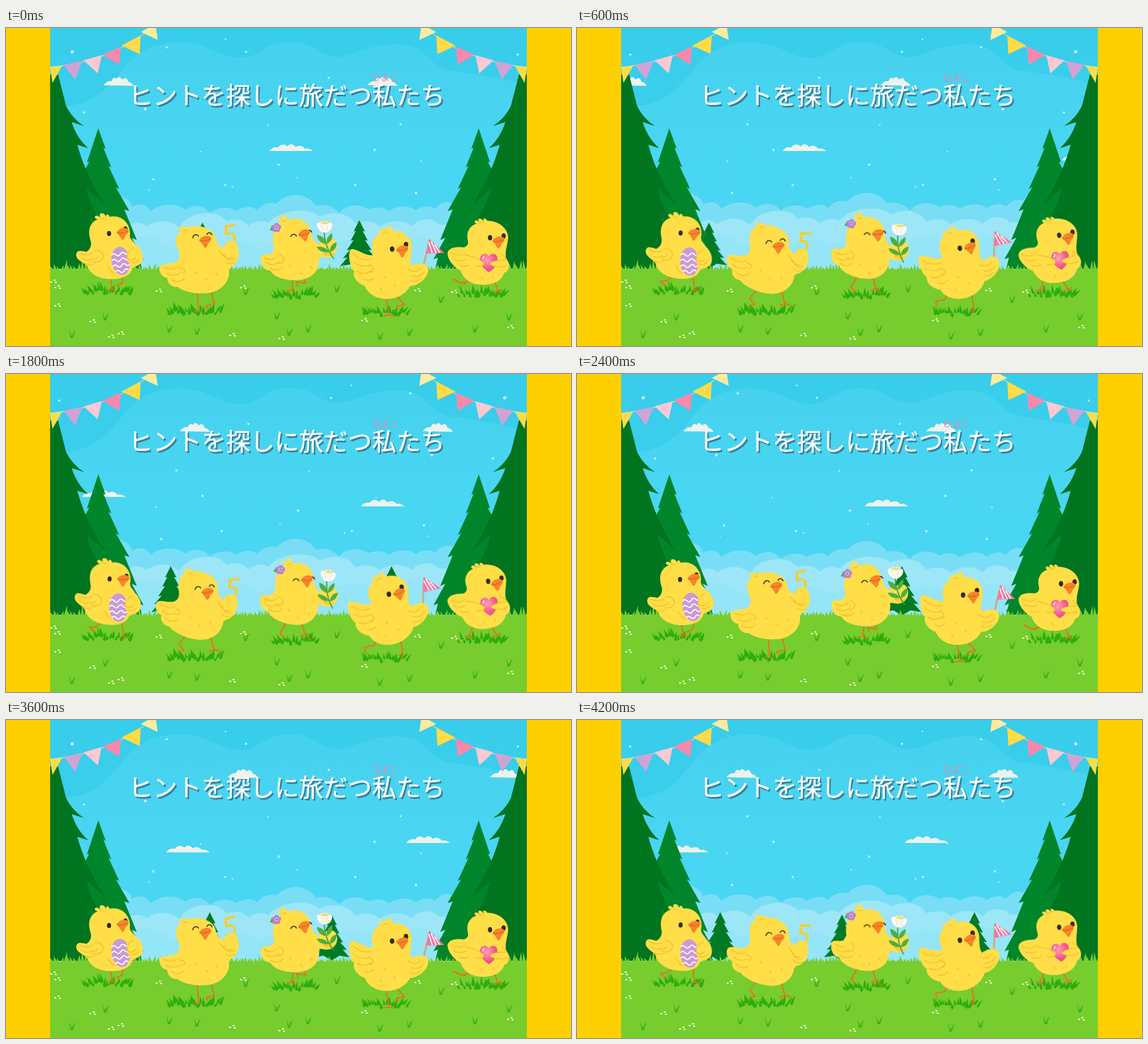
An HTML page that plays this animation: 998x561 px, repeating every 4.8 s.

```html
<!DOCTYPE html>
<html lang="ja">
<head>
<meta charset="utf-8">
<title>ひよこの旅</title>
<style>
  html, body { margin: 0; width: 100%; height: 100%; overflow: hidden; background: #ffd000; }
  svg { display: block; width: 998px; height: 561px; }

  .drift { animation: drift 4.8s step-end infinite; }
  .woods { animation: woods 4.8s step-end infinite; }
  .bank { animation: bank 1.2s step-end infinite; }
  .bob { animation: bob 1.2s step-end infinite; }
  .a { animation: first 1.2s step-end infinite; }
  .b { animation: second 1.2s step-end infinite; }

  @keyframes drift {
    0% { transform: none; }
    12.5% { transform: translateX(-102px); }
    25% { transform: translateX(-203px); }
    37.5% { transform: translateX(-331px); }
    50% { transform: translateX(-450px); }
    62.5% { transform: translateX(-567px); }
    75% { transform: translateX(-675px); }
    87.5%, 100% { transform: translateX(-803px); }
  }
  @keyframes woods {
    0% { transform: none; }
    12.5% { transform: translateX(-114px); }
    25% { transform: translateX(-227px); }
    37.5% { transform: translateX(-333px); }
    50% { transform: translateX(-440px); }
    62.5% { transform: translateX(-550px); }
    75% { transform: translateX(-654px); }
    87.5%, 100% { transform: translateX(-761px); }
  }
  @keyframes bank { 0% { transform: none; } 50%, 100% { transform: translateY(-4px); } }
  @keyframes bob { 0% { transform: none; } 50%, 100% { transform: var(--pose); } }
  @keyframes first { 0% { visibility: visible; } 50%, 100% { visibility: hidden; } }
  @keyframes second { 0% { visibility: hidden; } 50%, 100% { visibility: visible; } }

  .body { fill: #ffde48; }
  .line { fill: none; stroke: #f3bd2c; stroke-width: 1.5; stroke-linecap: round; stroke-linejoin: round; }
  .leg { fill: none; stroke: #f26a1b; stroke-width: 2; stroke-linecap: round; stroke-linejoin: round; }
  .eye { fill: #33291c; }
  .smile { fill: none; stroke: #4a3420; stroke-width: 1.8; stroke-linecap: round; }
  text { font-family: "Noto Sans CJK JP", "Noto Sans CJK", sans-serif; }
</style>
</head>
<body>
<svg viewBox="0 0 998 561" xmlns="http://www.w3.org/2000/svg">
  <defs>
    <linearGradient id="sky" x2="0" y2="1">
      <stop offset="0" stop-color="#38cdeb"/><stop offset="1" stop-color="#43d2ef"/>
    </linearGradient>
    <linearGradient id="haze" x2="0" y2="1">
      <stop offset="0" stop-color="#46d2ee"/><stop offset=".5" stop-color="#49d6f2"/>
    </linearGradient>
    <radialGradient id="rose" cx=".4" cy=".35">
      <stop offset="0" stop-color="#ff9fb9"/><stop offset="1" stop-color="#f0548a"/>
    </radialGradient>
    <path id="puff" fill="#eff2ec" d="M0 101C5 95 9 93 14 94C17 87 20 86 23 90C26 85 30 86 33 91C38 86 42 88 44 95C48 95 51 98 53 102Z"/>
    <path id="long" fill="#eff2ec" d="M0 217C4 211 10 209 15 211C21 204 27 204 32 209C37 203 42 204 47 210C53 206 59 208 63 213C69 211 73 214 77 217Z"/>
    <path id="fir" fill="#007a24" d="M0 339L10 359 6 358 15 375 10 374 22 392 16 391 29 406 21 405 34 420 15 417 0 426-15 417-34 420-21 405-29 406-16 391-22 392-10 374-15 375-6 358-10 359Z"/>
    <path id="beak" fill="#f5852a" d="M-11-1C-7-9 2-11 8-8C13-5 10 0 5 4C4 9 1 12-1 12C-4 7-6 3-11-1Z"/>
    <path id="beakLine" fill="none" stroke="#d9621a" stroke-width="1.2" d="M-10-1C-4 1 3-1 9-4"/>
    <g id="side">
      <path fill="#00852b" d="M163 177L176 213 172 211 186 246 181 243 200 284 194 281 218 323 209 320 231 374 222 370 243 408 235 405 240 425H78V330L112 318 122 290 137 265 132 264 147 236 143 237Z"/>
      <path fill="#00741f" d="M92 82L106 137C113 152 124 164 138 173L116 166C122 185 132 200 145 212L126 206C134 236 150 274 174 311L142 283C148 308 158 330 174 350L148 334C152 356 162 374 176 390L154 380 170 425H78V82Z"/>
      <path fill="none" stroke="#f7efc0" d="M78 69C150 62 218 38 262-6"/>
      <path fill="#fdeb9f" d="M238 7L264-7 268 21Z"/>
      <path fill="#ffdb48" d="M204 31L238 13 236 46ZM78 69L99 67 82 97Z"/>
      <path fill="#f988ac" d="M171 47L203 33 200 65Z"/>
      <path fill="#fcc9d2" d="M137 57L169 48 162 80Z"/>
      <path fill="#cfa4d5" d="M102 65L135 58 122 91Z"/>
    </g>
    <text id="title" x="216.500" y="134.500" font-size="43" stroke-width=".4" stroke-linejoin="round">ヒントを探しに旅だつ私たち</text>
  </defs>

  <rect width="998" height="561" fill="url(#sky)"/>
  <path fill="url(#haze)" d="M78 138C140 142 170 120 205 74C232 38 270 24 315 26C360 29 380 54 415 53C450 52 455 25 500 25C548 25 555 54 590 51C625 46 640 28 695 29C750 32 745 70 785 75C835 82 870 88 920 100V430H78Z"/>
  <g id="stars" fill="#b9f0fb" class="a"></g>
  <g id="mirrored" fill="#b9f0fb" class="b"></g>

  <g class="bank">
    <path fill="#79def5" d="M78 300C140 285 190 285 207 299C219 303 223 312 222 316C235 307 250 312 255 323C275 308 300 308 317 321C335 309 350 314 360 326C378 313 398 316 406 323C424 313 438 315 443 322C456 307 470 307 478 310C495 290 530 288 548 314C565 309 580 316 588 326C600 312 622 308 640 320C655 314 668 316 676 323C694 312 713 313 724 322C738 312 750 314 758 319C768 306 780 305 787 309C800 290 860 285 920 300V430H78Z"/>
    <path fill="#9de6f8" d="M78 350H215C225 341 240 342 248 350C268 336 292 338 306 352C320 323 374 318 390 341C405 335 420 338 428 349C440 340 452 338 464 344C482 320 535 315 554 333C576 322 605 325 617 345C640 338 650 342 660 350C680 338 704 338 716 350C732 334 754 334 764 347L920 350V430H78Z"/>
    <path fill="#8ae2f6" d="M207 380C240 360 272 365 290 388C330 370 350 380 372 394C410 370 430 372 450 390C500 360 540 365 560 386C610 366 640 372 660 390C710 360 740 366 785 384V430H207Z" opacity=".45"/>
  </g>

  <g class="drift">
    <use href="#puff" x="172"/><use href="#puff" x="638"/>
    <use href="#puff" x="1067"/><use href="#puff" x="1530"/>
    <use href="#long" x="465"/><use href="#long" x="1382"/>
    <use href="#long" x="958" y="16.500"/>
  </g>
  <g class="woods">
    <use href="#fir" x="624"/><use href="#fir" x="1014"/><use href="#fir" x="1463"/>
    <use href="#fir" transform="translate(347 28) scale(.93)"/>
    <use href="#fir" transform="translate(1229 28) scale(.93)"/>
  </g>
  <use href="#side"/>
  <use href="#side" transform="matrix(-1 0 0 1 998 0)"/>

  <path id="ground" fill="#77cc2e"/>
  <path id="tufts" fill="#2dad0d"/>
  <path id="sprigs" fill="#34b014"/>
  <g id="pebbles" fill="#f4f8dc"></g>

  <!-- egg -->
  <path class="leg a" d="M184 440L188 461 180 462M188 461L194 463M207 437L205 450 195 455"/>
  <path class="leg b" d="M170 438L158 446 147 447 157 455M205 439L208 462 216 465M208 462L202 464"/>
  <g class="bob" style="--pose:translate(-5px,-1px) rotate(6deg);transform-origin:184px 420px">
    <path class="body" d="M149 374C143 354 150 342 163 337C157 338 155 333 159 331C163 331 165 333 167 334C163 328 168 325 173 328C175 330 176 331 177 333C176 328 181 327 183 333C204 329 219 344 219 363C217 372 224 375 229 382C240 390 245 404 240 413C235 420 226 421 223 424C220 438 202 444 182 443C162 442 148 433 144 421C135 411 125 411 124 401C124 391 133 393 142 395C150 390 152 381 149 374Z"/>
    <path class="line" d="M166 337C168 335 171 335 173 337M157 393C165 390 172 398 172 404C168 414 157 414 153 411M130 397C138 401 147 401 153 397M133 406C139 410 147 411 153 407M140 416C145 419 152 419 157 415M162 403C160 409 154 409 152 407M180 420C182 426 188 432 193 433"/>
    <g transform="rotate(-9 202 411)">
      <ellipse cx="203" cy="411" rx="16.500" ry="25" fill="#c99bd6"/>
      <path fill="none" stroke="#fff" stroke-width="2" d="M188 399q4-5 8 0t8 0 8 0 6-2M187 409q4-5 8 0t8 0 8 0 8-2M187 419q4-5 8 0t8 0 8 0 8-2M190 429q4-5 8 0t8 0 8 0"/>
    </g>
    <path class="body" d="M223 390C215 395 213 402 214 407C214 412 217 415 221 418C217 423 217 430 221 428L225 420C237 418 244 405 237 397Z"/>
    <path class="line" d="M225 388C216 392 212 402 215 407M216 408C221 411 226 408 229 405M220 413C226 416 231 413 234 409"/>
    <ellipse class="eye" cx="182" cy="362.500" rx="3.600" ry="4.500"/>
    <ellipse class="eye" cx="211" cy="354.500" rx="3.600" ry="4.500"/>
    <use href="#beak" x="206" y="362"/><use href="#beakLine" x="206" y="362"/>
  </g>

  <!-- number -->
  <path class="leg a" d="M338 466L340 496 333 500M340 496L344 501M362 465L368 486 353 490 357 496"/>
  <path class="leg b" d="M317 462L305 477 314 487 305 490M361 461L367 486 359 489M367 486L378 489"/>
  <g class="bob" style="--pose:translate(-12px,-1px) rotate(14deg);transform-origin:345px 440px">
    <path fill="none" stroke="#fbcd22" stroke-width="4" stroke-linejoin="round" d="M404 347L388 350 389 364C397 360 405 363 404 372C403 380 394 383 387 379"/>
    <path class="body" d="M302 386C298 370 303 361 310 356C303 357 302 351 307 351C311 352 313 354 314 355C308 349 314 346 318 352C340 345 369 352 371 374C375 386 382 388 386 387C388 378 397 372 405 378C414 388 414 407 403 418C398 422 394 422 394 428C396 450 376 468 350 468C330 469 312 464 303 457C292 458 284 449 285 441C276 440 270 431 271 422C276 412 297 420 305 408C309 401 305 393 302 386Z"/>
    <path class="line" d="M314 358C316 355 319 356 320 358M279 422C288 427 298 426 305 421M284 433C292 438 302 437 309 431M291 443C299 449 309 449 315 442M307 424C317 424 319 430 312 433M377 393C385 406 394 408 399 405M385 400C391 410 399 411 405 406M388 413C394 417 400 417 405 413M333 429l3 4M353 441l3 4M371 432l3 4"/>
    <g class="bob" style="--pose:translate(2px,8px) rotate(-13deg);transform-origin:351px 374px">
      <path class="smile" d="M330 370C331 364 338 363 340 367M355 364C357 360 362 360 364 365"/>
      <use href="#beak" x="352" y="376"/><use href="#beakLine" x="352" y="376"/>
    </g>
  </g>

  <!-- flower -->
  <path class="leg a" d="M507 443L505 462 497 465M505 462L512 468M524 439L530 450 513 448 516 455"/>
  <path class="leg b" d="M495 438L484 458 492 466M522 439L528 459 520 463M528 459L538 469"/>
  <g class="bob" style="--pose:translate(-3px,-3px) rotate(8deg);transform-origin:510px 420px">
    <path class="body" d="M474 388C468 367 474 350 487 342C479 341 477 337 481 335C485 335 488 337 490 338C485 332 486 329 490 329C494 331 496 335 497 338C516 331 535 341 538 359C539 370 546 378 552 381C560 373 578 366 583 377C589 390 581 404 568 405C562 406 555 402 553 405C556 427 540 445 512 445C489 445 472 438 467 428C456 428 449 417 450 405C450 397 465 401 470 397Z"/>
    <path class="line" d="M488 342C490 340 493 340 495 341M456 405C464 410 472 409 478 405M459 414C467 420 477 418 482 412M467 424C475 429 485 427 489 421M482 400C494 402 493 416 481 415M555 386C563 399 570 400 575 395M561 396C567 403 575 402 580 396M501 419l3 4M520 431l3 4M537 420l3 4"/>
    <path fill="none" stroke="#3e9d39" stroke-width="2" d="M562 360C563 378 568 393 579 407"/>
    <path fill="#4caf43" d="M565 381C556 380 550 374 549 365C560 367 565 373 565 381ZM567 381C565 372 569 366 576 362C578 371 574 377 567 381ZM571 395C560 397 552 393 549 386C560 385 567 389 571 395ZM572 395C572 385 577 380 584 378C584 388 580 393 572 395Z"/>
    <path fill="#fffaf0" d="M549 347C549 342 554 343 555 344C556 340 560 340 562 342C565 339 569 341 570 344C575 342 577 346 576 349C575 357 569 361 562 361C555 360 550 355 549 347Z"/>
    <path fill="none" stroke="#eadcae" d="M556 346L560 358M569 346L566 358"/>
    <ellipse cx="563" cy="344" rx="7" ry="2.500" fill="#ffd968"/>
    <path fill="#69a73b" d="M470 348L466 357 474 358Z"/>
    <g fill="#b684cb">
      <circle cx="478" cy="348" r="4"/><circle cx="482" cy="351" r="4"/>
      <circle cx="480" cy="356" r="4"/><circle cx="475" cy="356" r="4"/><circle cx="474" cy="351" r="4"/>
    </g>
    <circle cx="478" cy="352" r="3.500" fill="#d9b2e2"/><circle cx="478" cy="352" r="1.500" fill="#8b579f"/>
    <path class="smile" d="M503 368C505 363 511 363 513 367M531 360C533 356 538 356 540 360"/>
    <use href="#beak" transform="translate(527 365) rotate(-12)"/><use href="#beakLine" x="527" y="365"/>
  </g>

  <!-- flag -->
  <path class="leg a" d="M671 474L677 506 667 508M677 506L685 508M689 472L704 488 690 491 693 497"/>
  <path class="leg b" d="M654 470L650 479 634 482 635 492M697 470L701 492 694 497M701 492L699 503"/>
  <g class="bob" style="--pose:translate(4px,-1px) rotate(-11deg);transform-origin:675px 440px">
    <path stroke="#d9a66c" stroke-width="3" stroke-linecap="round" d="M735 430L748 374"/>
    <path fill="#f477a2" d="M748 372L774 397 742 398Z"/>
    <path stroke="#fff" stroke-width="2" d="M747 378L753 397M751 376L760 397M757 382L766 396"/>
    <path class="body" d="M649 400C642 381 649 368 662 361C655 361 655 356 660 356C664 356 666 357 667 359C662 353 666 350 671 354L675 358C670 350 675 346 679 350C682 353 682 356 683 358C704 357 717 370 717 387C716 398 712 410 716 419C728 414 742 413 746 424C748 436 732 455 714 455C706 470 690 478 671 478C651 477 638 467 634 455C620 451 611 437 615 429C606 420 603 395 610 390C621 389 638 405 649 400Z"/>
    <path class="line" d="M666 362C669 359 672 359 674 361M613 398C622 408 637 411 645 408M614 413C625 421 636 422 644 418M620 429C628 434 637 434 645 428M633 443C638 446 645 446 650 440M643 419C651 424 650 431 642 431M710 425C718 431 727 431 732 424M716 437C724 440 733 438 738 431M714 445C721 449 728 447 733 442M667 437l3 4M685 452l3 4M661 459l3 4"/>
    <ellipse class="eye" cx="682" cy="390" rx="4" ry="4.800"/>
    <ellipse class="eye" cx="706.500" cy="382" rx="4" ry="4.800"/>
    <use href="#beak" x="700" y="393"/><use href="#beakLine" x="700" y="393"/>
  </g>

  <!-- heart -->
  <path class="leg a" d="M822 445L804 450 790 443M804 450L812 451M863 447L869 464 861 466M869 464L875 467"/>
  <path class="leg b" d="M825 445L819 460 812 465M819 460L823 467M858 446L867 461 860 464M867 461L874 458"/>
  <g class="bob" style="--pose:translate(2px,-3px) rotate(-6deg);transform-origin:840px 420px">
    <path class="body" d="M816 376C812 360 819 349 831 345C825 343 828 338 833 340L837 343C831 337 836 334 841 338L844 342C841 335 846 334 850 340C871 340 887 354 887 370C886 384 880 396 884 408C892 416 889 430 880 432C875 447 861 453 841 453C821 453 807 442 803 428C789 421 779 406 780 396C784 385 800 386 809 387C815 385 817 381 816 376Z"/>
    <path class="line" d="M836 345C838 342 841 342 843 343M786 396C795 402 805 402 811 397M790 407C799 412 808 411 813 406M801 418C808 422 817 420 821 414M812 401C820 400 825 410 817 416M875 399C880 403 883 405 884 408"/>
    <path fill="url(#rose)" d="M853 431C844 425 837 417 837 409C837 397 849 395 853 403C857 395 869 397 868 408C868 417 862 425 853 431Z"/>
    <path stroke="#ffd4de" stroke-width="2.500" stroke-linecap="round" d="M844 403L842 407"/>
    <path class="body" d="M812 403C823 402 834 408 842 412C847 417 842 422 832 420C819 423 808 413 812 403ZM885 408C875 409 858 411 855 416C857 422 881 425 886 419Z"/>
    <path class="line" d="M817 402C830 404 838 409 844 414C844 420 837 422 829 419M884 409C870 409 857 412 855 416C861 422 877 423 884 419M839 439l3 4M859 437l2 4"/>
    <ellipse class="eye" cx="855" cy="370" rx="3.800" ry="4.800"/>
    <ellipse class="eye" cx="879" cy="367" rx="3.800" ry="4.800"/>
    <use href="#beak" x="870" y="377"/><use href="#beakLine" x="870" y="377"/>
  </g>

  <use href="#title" x="2.500" y="3" fill="#347f9e" stroke="#347f9e"/>
  <use href="#title" fill="#fff" stroke="#fff"/>
  <text x="670" y="93" font-size="15.500" text-anchor="middle" fill="#f47fae">ひよこ</text>
  <path fill="#ffd000" d="M0 0H78V561H0ZM920 0H998V561H920Z"/>
</svg>
<script>
  const $ = id => document.getElementById(id);
  const rng = seed => () => (seed = seed * 16807 % 2147483647) / 2147483647;
  const rand = rng(2024);
  const range = (lo, hi) => lo + rand() * (hi - lo);

  const stars = [
    [117, 42, 3], [284, 34, 2], [388, 20, 1.5], [424, 42, 2], [904, 47, 2], [570, 88, 2],
    [138, 149, 2], [246, 143, 2.5], [697, 170, 2], [463, 171, 1.5], [344, 218, 1.3],
    [651, 215, 2.2], [482, 241, 2.2], [733, 235, 1.5], [260, 267, 2.2], [253, 286, 1.2],
    [387, 277, 2], [400, 280, 1.5], [514, 264, 1.3], [617, 277, 2.2], [724, 291, 2.2]
  ];
  const dots = flip => stars.map(([x, y, r]) =>
    `<circle cx="${flip ? 998 - x : x}" cy="${y}" r="${r}"/>`).join('');
  $('stars').innerHTML = dots(false);
  $('mirrored').innerHTML = dots(true);

  // Meadow with a ragged top edge, taller at both ends
  let edge = 'M78 561V426';
  for (let x = 78; x < 920; x += 6) {
    const tall = Math.abs(x - 499) > 340 ? 18 : 11;
    edge += `L${x + range(-2, 7)} ${426 - range(tall * .3, tall)}L${x + 6} ${426 + range(0, 2)}`;
  }
  $('ground').setAttribute('d', edge + 'V561Z');

  // A curved blade from its base to a tip offset by dx and h
  const blade = (x, y, dx, h, w) =>
    `M${x - w} ${y}Q${x - w / 2 + dx * .2} ${y - h * .6} ${x + dx} ${y - h}` +
    `Q${x + w + dx * .2} ${y - h * .4} ${x + w} ${y}L${x} ${y + w}Z`;

  // Dark grass under each chick: left, base, width
  const clump = ([left, y, width]) => {
    let d = '';
    for (let x = 0; x < width; x += 5) {
      const lean = (x / width - .5) * 16 + range(-3, 3);
      d += blade(left + x, y + range(-3, 5), lean, range(7, 15), range(2, 4));
    }
    return d;
  };
  $('tufts').setAttribute('d', [
    [139, 464, 84], [289, 500, 94], [473, 472, 80], [633, 503, 80], [800, 469, 82]
  ].map(clump).join(''));

  const sprigs = [
    [175, 515], [116, 546], [288, 536], [337, 540], [423, 470], [478, 513], [533, 536],
    [500, 542], [584, 465], [768, 484], [828, 536], [660, 549], [712, 542], [888, 515]
  ];
  $('sprigs').setAttribute('d', sprigs.map(([x, y]) =>
    blade(x - 1, y, -5, 16, 1.3) + blade(x + 1, y, 6, 13, 1.3)).join(''));

  const pebbles = [
    [84, 447], [91, 457], [91, 489], [203, 538], [186, 544], [400, 541], [419, 457], [270, 463],
    [487, 547], [633, 515], [727, 462], [792, 465], [891, 527], [153, 517]
  ];
  $('pebbles').innerHTML = pebbles.map(([x, y]) =>
    [[-4, 1], [2, -2], [4, 2]].map(([dx, dy]) =>
      `<ellipse cx="${x + dx}" cy="${y + dy}" rx="2" ry="1.2"/>`).join('')).join('');
</script>
</body>
</html>
```
